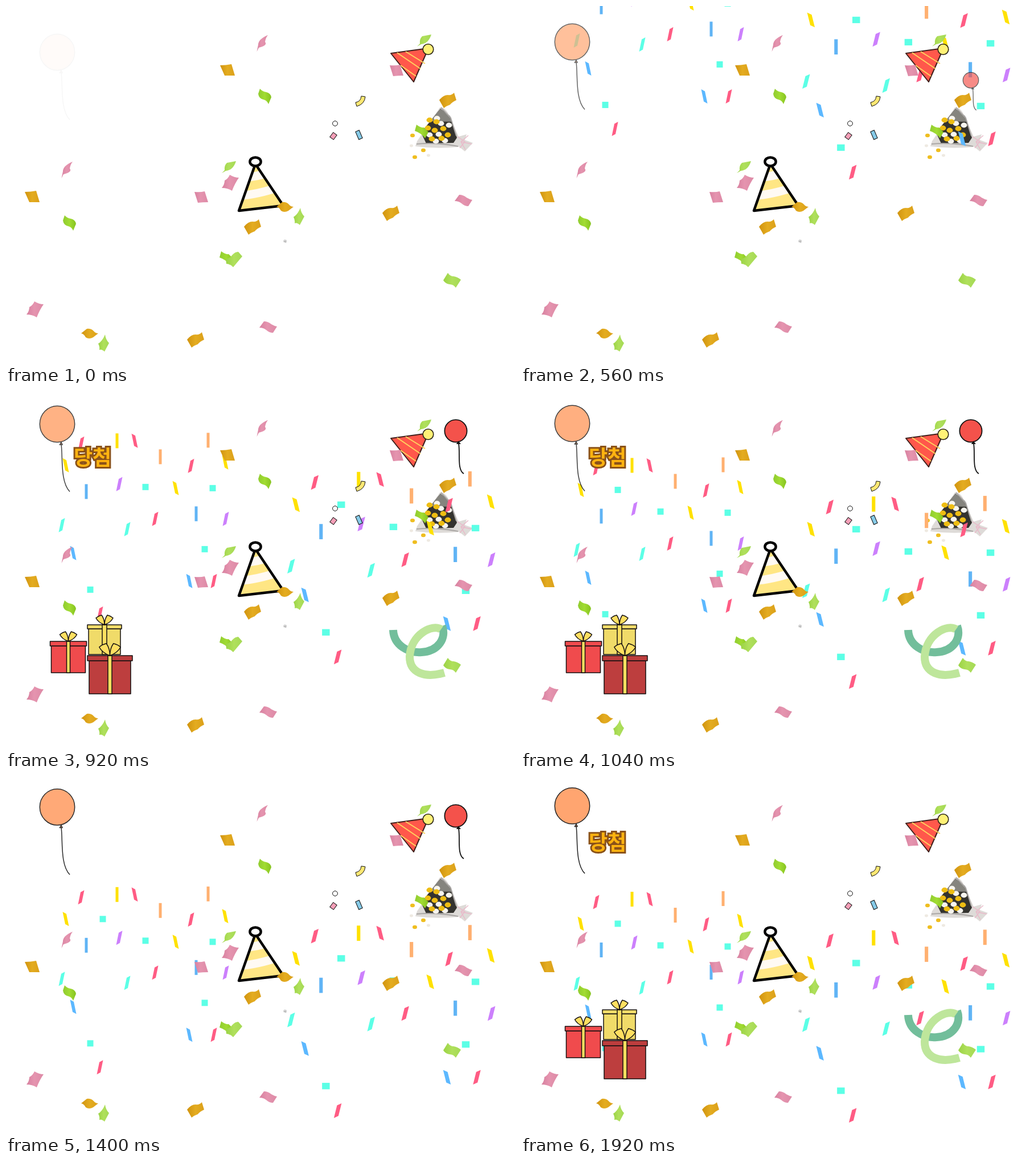
Recreate the animation shown at these times as an HTML page. Size 894 by 626 pixels, loop 1.96 s.

```html
<!DOCTYPE html>
<html lang="ko">
<head>
<meta charset="utf-8">
<style>
html, body { margin: 0; width: 100%; height: 100%; overflow: hidden; background: #fff; }
svg { display: block; width: 894px; height: 626px; }
.prize { font: 900 36px "Noto Sans CJK KR", "Noto Sans CJK", "Noto Sans", sans-serif; fill: #ffb310; stroke: #8a5219; stroke-width: 6; paint-order: stroke; text-anchor: middle; }
.tiny { font: 5px "Noto Sans CJK KR", "Noto Sans CJK", sans-serif; text-anchor: middle; }
</style>
</head>
<body>
<svg viewBox="0 0 894 626">
  <defs>
    <linearGradient id="pink"><stop stop-color="#d7809f"/><stop offset=".45" stop-color="#e594af"/><stop offset="1" stop-color="#dd8aa6"/></linearGradient>
    <linearGradient id="gold"><stop stop-color="#d0930f"/><stop offset=".5" stop-color="#e4ac20"/><stop offset="1" stop-color="#dba01a"/></linearGradient>
    <linearGradient id="green"><stop stop-color="#90cc30"/><stop offset=".5" stop-color="#a1dc32"/><stop offset="1" stop-color="#86c320"/></linearGradient>
    <linearGradient id="lime"><stop stop-color="#9bd345"/><stop offset=".5" stop-color="#b0e05c"/><stop offset="1" stop-color="#a4d955"/></linearGradient>
    <clipPath id="cone"><path d="M438 277L409 359L487 350Z"/></clipPath>
    <g id="pieces"></g>
    <g id="scraps">
      <g fill="url(#pink)">
        <path d="M460 51Q443 58 443 68L440.500 80L444 73Q460 69 455 63Q456 56 460 51Z"/>
        <path d="M674 104Q684 105 692 103L698 122Q689 122 680 123Z"/>
        <path d="M393 296Q401 301 409 301Q402 311 397 324Q389 319 379 319Q384 313 384 306Q390 303 393 296Z"/>
        <path d="M788 342L796 331Q803 331 809 336Q814 339 819 340L812 351Q805 351 800 346Q795 342 788 342Z"/>
      </g>
      <g fill="url(#gold)">
        <path d="M376 104Q386 104 396 102L402 122Q393 122 384 122Z"/>
        <path id="wave" d="M761 165Q768 156 776 156Q783 157 787 152L791 165Q784 168 780 173Q774 175 769 179Z"/>
        <use href="#wave" x="-100" y="198"/>
        <path d="M475 352L485 344Q492 343 497 348Q500 352 505 352L496 359Q489 363 483 359Q480 353 475 352Z"/>
      </g>
      <g fill="url(#green)">
        <path d="M446 145Q450 150 457 151Q465 153 466 160L461 172Q458 165 452 164Q444 162 443 154Z"/>
        <path d="M721 208Q728 214 734 213L742 221L736 232Q730 223 718 219Z"/>
      </g>
      <g fill="url(#lime)">
        <path d="M776 468Q780 474 786 474Q793 475 799 480L790 494Q786 488 779 488Q772 487 768 481Z"/>
        <path d="M747 50L731 53Q726 58 727 66L722 71L729 67Q742 66 747 50Z"/>
        <path d="M517 354Q518 363 524 369L516 384Q511 379 507 381Q508 376 505 370Q512 366 517 354Z"/>
      </g>
    </g>
  </defs>

  <g id="bouquet">
    <path d="M762 178Q770 177 776 187L795 229L809 225L806 235L820 240L806 255L796 247Q755 251 719 246L722 237Z" fill="#dedbd8"/>
    <path d="M763 180L780 193L792 231L786 240L738 241L729 222Z" fill="#34332f"/>
    <path d="M763 180L779 193L783 203L745 202Z" fill="#85847e"/>
    <path d="M764 178L781 196L791 228M721 242Q755 239 794 246" fill="none" stroke="#aaa7a5" stroke-width="2"/>
    <g id="flowers"></g>
    <path d="M793 229L806 238L797 249M799 238L812 227M799 238L818 242M799 238L807 252" fill="none" stroke="#e9b9c9" stroke-width="1.5"/>
  </g>

  <g id="drops">
    <use href="#pieces"/>
    <use href="#pieces" transform="matrix(1.222 0 0 1.027 381 62)"/>
  </g>

  <g stroke="#111">
    <path d="M614 169Q623 168 624 158L631 159Q630 172 616 176Z" fill="#ffe873"/>
    <circle cx="578" cy="206" r="4.4" fill="#fff"/>
    <rect x="-4" y="-5" width="8" height="10" fill="#f79fb8" transform="translate(575 228) rotate(36)"/>
    <rect x="-3.5" y="-7.5" width="7" height="15" fill="#87cbe8" transform="translate(620 226) rotate(-23)"/>
  </g>

  <g>
    <path d="M676 83L742 74L716 133Z" fill="#ff584b" stroke="#40201c" stroke-width="2" stroke-linejoin="round"/>
    <path d="M702 80L736 101M687 82L728 110M693 104L720 123" stroke="#ffd35e" stroke-width="2"/>
    <circle cx="741.5" cy="76" r="9.3" fill="#fff176" stroke="#2a2416" stroke-width="1.6"/>
  </g>

  <g>
    <path d="M438 277L409 359L487 350Z" fill="#ffe684"/>
    <path d="M420 300Q440 300 460 292M408 333Q440 331 482 317" fill="none" stroke="#fffaf3" stroke-width="15" clip-path="url(#cone)"/>
    <path d="M438 277L409 359L487 350Z" fill="none" stroke="#000" stroke-width="4.5" stroke-linejoin="round"/>
    <ellipse cx="438" cy="273" rx="9.6" ry="7.6" fill="#fff" stroke="#000" stroke-width="4.5"/>
  </g>
  <text class="tiny" x="490" y="414">다</text>

  <g id="blink">
    <text class="prize" x="152" y="130">당첨</text>
    <g id="gifts" stroke="#151010" stroke-width="1.5" stroke-linejoin="round"></g>
    <g fill="none" stroke-width="14">
      <path d="M680 419C681 446 707 460 730 458C760 456 774 433 766 412" stroke="#72be9b"/>
      <path d="M764 418C750 408 711 426 709 466C709 494 735 504 770 494" stroke="#bee69b"/>
    </g>
  </g>

  <use href="#scraps"/>
  <use href="#scraps" x="-343" y="222"/>
  <path d="M386 443Q393 443 397 437Q402 431 408 431L415 439L399 458Q394 452 387 452Z" fill="url(#lime)"/>

  <g id="peach" stroke="#222" stroke-width="1.5">
    <path d="M97 88C100 110 95 153 112 170.500" fill="none"/>
    <ellipse cx="90" cy="52" rx="30.700" ry="31.700" fill="#ffa570"/>
    <path d="M97 84L94.500 88L99 88Z" fill="#ffa570"/>
  </g>
  <g id="red" stroke="#111" stroke-width="1.8">
    <path d="M795 92C798 110 792 138 804 145" fill="none"/>
    <circle cx="790" cy="70" r="19.600" fill="#f4524b"/>
    <path d="M794.500 89L792.500 92L797 92Z" fill="#f4524b"/>
  </g>
</svg>
<script>
const $ = id => document.getElementById(id);
const LOOP = 1960;

// Falling pieces: shape, colour, then resting places as x,y pairs
const shapes = {
  bar: "-2.5,-13 2.5,-13 2.5,13 -2.5,13",
  box: "-5.5,-5.5 5.5,-5.5 5.5,5.5 -5.5,5.5",
  rise: "-1,-9 5.5,-12.5 1,9 -5.5,12.5",
  fall: "1,-9 -5.5,-12.5 -1,9 5.5,12.5"
};
const sets = [
  ["rise", "#ff5c84", "132,221 325,260 262,353 365,462 165,519"],
  ["fall", "#ff5c84", "226,216"],
  ["bar", "#ffe100", "195,216"],
  ["fall", "#ffe100", "105,259 385,254 298,299"],
  ["bar", "#ffb070", "355,215 271,244"],
  ["bar", "#60b4f5", "141,305 334,344"],
  ["fall", "#5cb8ff", "118,413 322,462"],
  ["rise", "#cc80fc", "199,292 386,353"],
  ["rise", "#5cffe6", "98,364 213,371"],
  ["box", "#5cffe6", "170,259 245,297 363,299 349,406 148,477"]
];
$("pieces").innerHTML = sets.map(([kind, color, spots]) => spots.split(" ").map(p =>
  `<polygon points="${shapes[kind]}" fill="${color}" transform="translate(${p})"/>`).join("")).join("");

const dots = (spots, r, color) => spots.split(" ").map(p => {
  const [x, y] = p.split(",");
  return `<ellipse cx="${x}" cy="${y}" rx="${r}" ry="${r * .8}" fill="${color}"/>`;
}).join("");
$("flowers").innerHTML =
  dots("757,197 764,206 778,209 760,225 744,226 755,237 771,236", 5.5, "#f7f5ef") +
  dots("744,200 756,203 741,214 753,218 768,215 776,226 765,232 748,233", 5.5, "#eebd13") +
  dots("714,227 733,253 718,265", 4, "#efbe20") +
  dots("712,245 742,262", 3, "#eeeae2");

// Gift box: lid centre and top, lid size, body size, ribbon width, bow scale
function gift(x, y, lidW, lidH, w, h, band, bow, color) {
  const rect = (w, y, h, fill) => `<rect x="${x - w / 2}" y="${y}" width="${w}" height="${h}" fill="${fill}"/>`;
  const loop = side => `<path d="M0 0Q-11 -4 -15 -12Q-10 -16 -5 -17Q0 -10 0 0Z" fill="#ffdf60"
    vector-effect="non-scaling-stroke" transform="translate(${x} ${y}) scale(${side * bow} ${bow})"/>`;
  return rect(w, y + lidH, h, color) + rect(lidW, y, lidH, color) +
    rect(band, y, h + lidH, "#ffdf60") + loop(1) + loop(-1);
}
$("gifts").innerHTML =
  gift(173, 410, 60, 7, 56, 45, 8, 1, "#f0db69") +
  gift(109.5, 439, 64, 8, 60, 47, 6, 1, "#f04b4d") +
  gift(182.5, 464, 79, 9, 73, 58, 7, 1.25, "#bd3e3e");

// Linear interpolation through [time, value] points
function track(points, t) {
  const i = points.findIndex(p => p[0] > t);
  if (i < 0) return points[points.length - 1][1];
  const [a, u] = points[i - 1], [b, v] = points[i];
  return u + (v - u) * (t - a) / (b - a);
}

// Ease-in-out: cubic-bezier(.42, 0, .58, 1)
function ease(x) {
  if (x <= 0) return 0;
  if (x >= 1) return 1;
  let lo = 0, hi = 1, s;
  for (let i = 0; i < 20; i++) {
    s = (lo + hi) / 2;
    if (1.26 * s * (1 - s) ** 2 + 1.74 * s * s * (1 - s) + s ** 3 < x) lo = s; else hi = s;
  }
  return s * s * (3 - 2 * s);
}

const fallRoot = [[0, 28], [240, 23.47], [560, 17.44], [920, 11.36], [1200, 6.48], [1560, 0]];
const lift = [[0, 29], [240, 17], [560, 11], [920, 6], [1200, 3.7], [1560, 1.5], [1920, .4], [1960, .3]];

// Red balloon: rises small, swells, holds, shrinks and leaves upward
const TRAVEL = 425, MOVE = 725, SWELL = 181, ENTER = 12, LEAVE = 1420;
function redPose(t) {
  const rise = ease((t - ENTER) / MOVE);
  const exit = ease((t - LEAVE - SWELL) / MOVE);
  const full = ease((t - ENTER - MOVE) / SWELL) - ease((t - LEAVE) / SWELL);
  return {
    y: TRAVEL * (1 - rise - exit),
    scale: .7 + .3 * full,
    alpha: t < ENTER ? 0 : .44 + .26 * (rise - exit) + .3 * full
  };
}

function draw() {
  const t = performance.now() % LOOP;
  $("drops").setAttribute("transform", `translate(0 ${-(track(fallRoot, t) ** 2)})`);

  const up = track(lift, t);
  $("peach").setAttribute("transform", `translate(0 ${up})`);
  $("peach").setAttribute("opacity", 1 - (up / 29.8) ** 1.2);

  const { y, scale, alpha } = redPose(t);
  $("red").setAttribute("transform", `translate(790 ${98 + y}) scale(${scale}) translate(-790 -98)`);
  $("red").setAttribute("opacity", alpha);

  $("blink").setAttribute("visibility", Math.floor((t + 390) / 430) % 2 ? "visible" : "hidden");
  requestAnimationFrame(draw);
}
draw();
</script>
</body>
</html>
```
